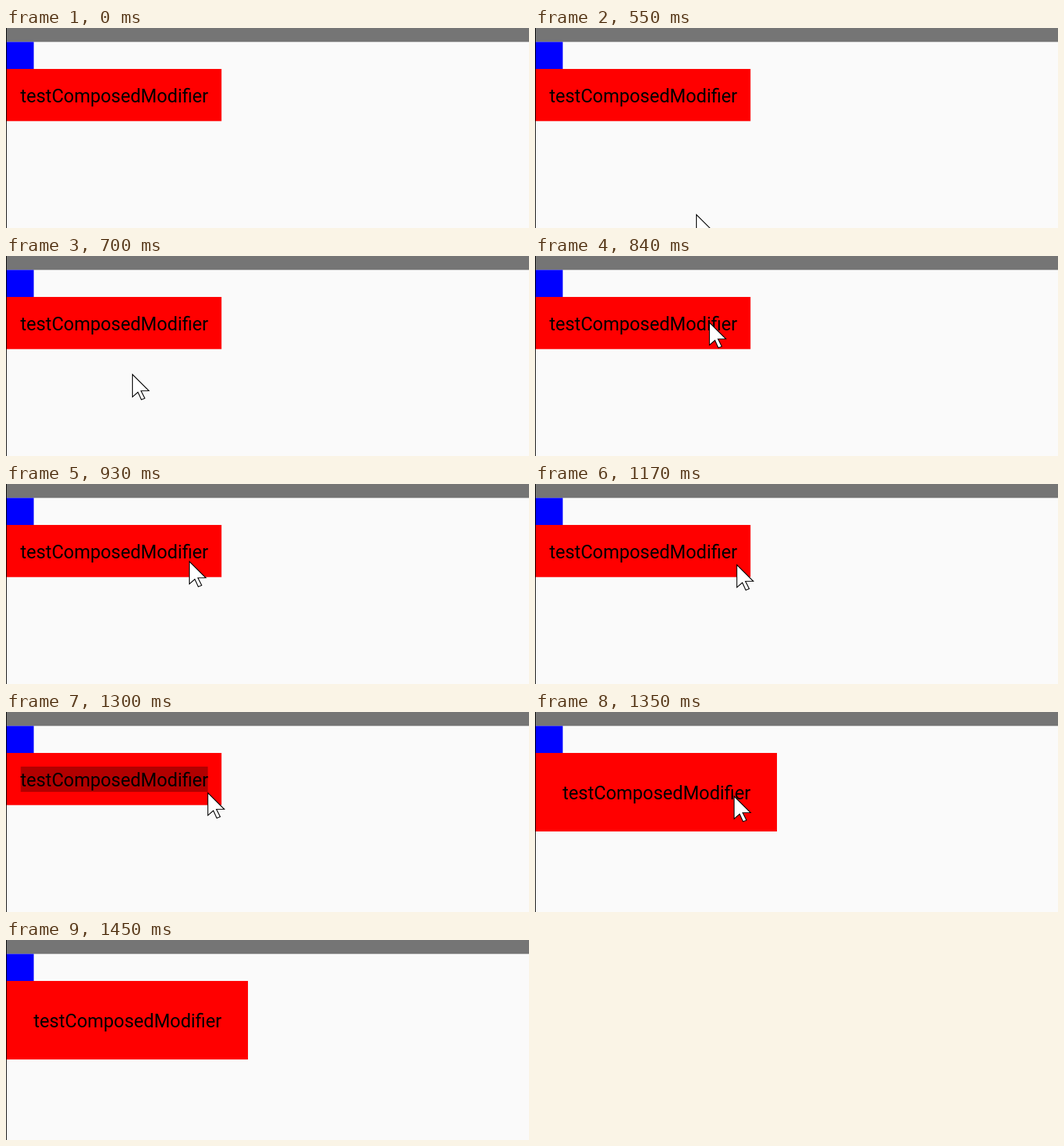
An HTML page with a canvas that plays this animation: 763 px wide and 293 px high, repeating every 2.62 s.

```html
<!DOCTYPE html>
<html lang="en">
<head>
<meta charset="utf-8">
<title>Composed modifier</title>
<style>
  html, body { margin: 0; width: 100%; height: 100%; overflow: hidden; background: #fafafa; }
  canvas { display: block; }
</style>
</head>
<body>
<canvas id="stage" width="763" height="293"></canvas>
<script>
const ctx = document.getElementById('stage').getContext('2d');
const LOOP = 2620;
const ENTER = 550, PRESS = 1300, GROW = 1350, LEAVE = 1450;
const PAD = 19.3;

// Each move is a quadratic curve, sampled in a few equal steps
const moves = [
  { start: ENTER, end: 840, steps: 6, from: [235, 273], bend: [124, 160], to: [254, 97] },
  { start: 840, end: 1020, steps: 4, from: [254, 97], bend: [270, 117], to: [275, 119] },
  { start: 1020, end: 1120, steps: 2, from: [275, 119], bend: [297, 118], to: [294, 118] },
  { start: GROW, end: 1490, steps: 2, from: [290, 123], bend: [270, 224], to: [250, 325] }
];

const arrow = new Path2D('M0 0V33L8 26L13 37L18 35L12.5 24H24Z');

function pointerAt(t) {
  const { start, end, steps, from, bend, to } = moves.findLast(m => m.start <= t);
  const u = Math.min(1, Math.floor((t - start) / (end - start) * steps) / steps);
  const v = 1 - u;
  return from.map((p, i) => Math.round(v * v * p + 2 * u * v * bend[i] + u * u * to[i]));
}

function rect(color, x, y, w, h) {
  ctx.fillStyle = color;
  ctx.fillRect(x, y, w, h);
}

function drawPointer(x, y) {
  ctx.save();
  ctx.translate(x + 0.5, y + 0.5);
  ctx.fillStyle = '#fff';
  ctx.fill(arrow);
  ctx.strokeStyle = '#000';
  ctx.lineWidth = 1.2;
  ctx.stroke(arrow);
  ctx.restore();
}

function draw(t) {
  const extra = t >= GROW ? PAD : 0;

  rect('#fafafa', 0, 0, 763, 293);
  rect('#757575', 0, 0, 763, 20.4);
  rect('#000', 0, 0, 1, 293);
  rect('#00f', 1, 20.4, 39.5, 39.6);
  rect('#f00', 1, 60, 313.4 + extra * 2, 76.4 + extra * 2);

  if (t >= PRESS && t < GROW) rect('rgba(0,0,0,0.3)', 21.5, 80, 273, 37);

  ctx.fillStyle = '#000';
  ctx.font = '26.85px Roboto, sans-serif';
  ctx.fillText('testComposedModifier', 21 + extra, 109 + extra);

  if (t >= ENTER && t < LEAVE) drawPointer(...pointerAt(t));
}

function tick() {
  draw(performance.now() % LOOP);
  requestAnimationFrame(tick);
}
tick();
</script>
</body>
</html>
```
